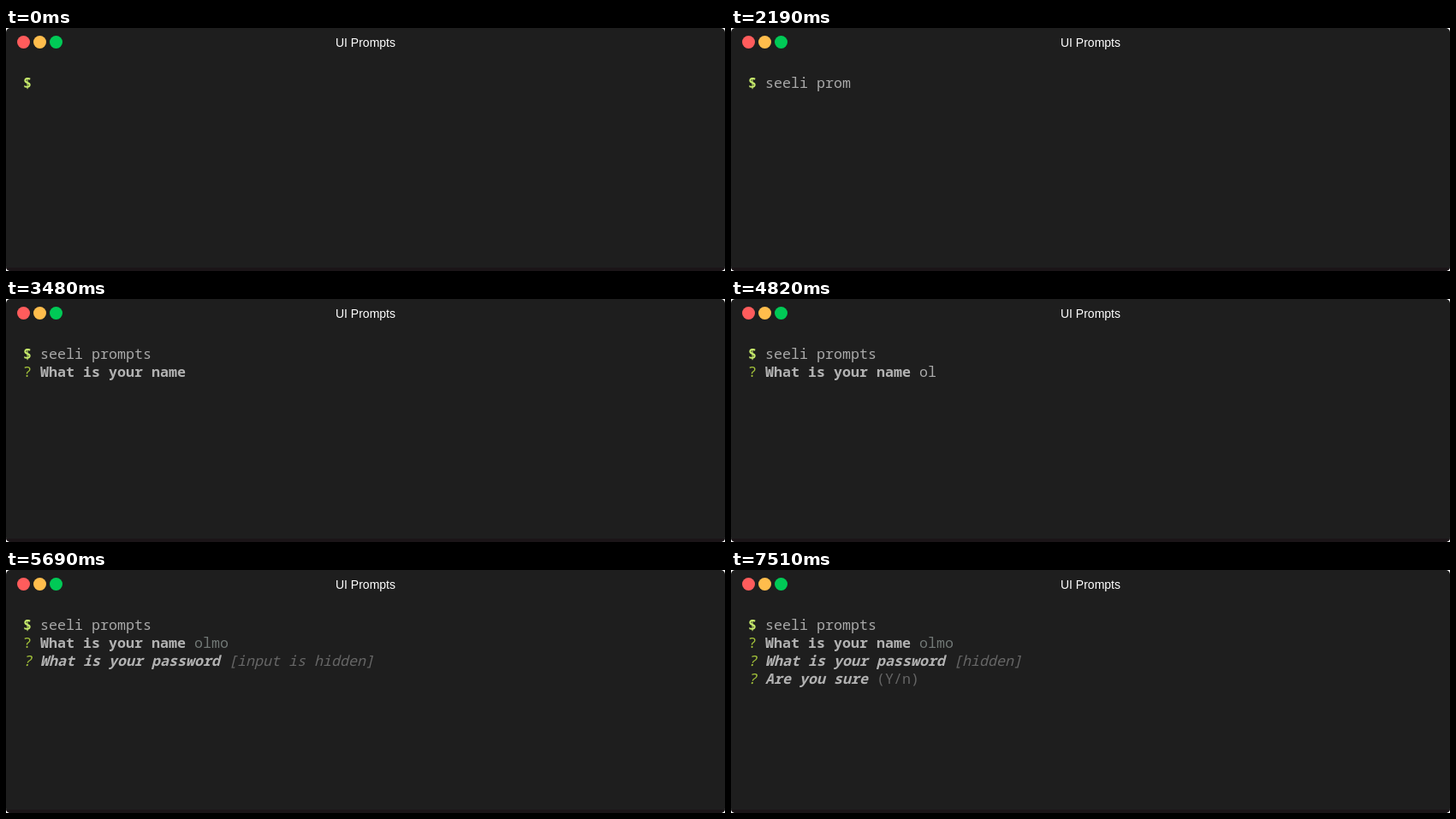
An HTML page that plays this animation: 840x284 px, repeating every 8 s.

```html
<!DOCTYPE html>
<html lang="en">
<head>
<meta charset="utf-8">
<title>UI Prompts</title>
<style>
  html, body { margin: 0; width: 100%; height: 100%; overflow: hidden; background: #fff; }
  svg { display: block; width: 840px; height: 284px; }
  text { white-space: pre; }
  .title { font: 14px "Liberation Sans", Arial, sans-serif; fill: #fff; text-anchor: middle; }
  #screen { font: 16.6667px "Noto Sans Mono", monospace; }
  .prompt { fill: #c8ec6c; font-weight: 700; }
  .plain { fill: #a9a9a9; }
  .mark { fill: #a4c43a; }
  .bold { fill: #b2b2b2; font-weight: 700; }
  .answer { fill: #717876; }
  .dim { fill: #666; }
  .slant { font-style: italic; }
</style>
</head>
<body>
<svg viewBox="0 0 840 284">
  <defs><clipPath id="window"><rect width="840" height="284" rx="5"/></clipPath></defs>
  <g clip-path="url(#window)">
    <rect width="840" height="284" fill="#1e1e1e"/>
    <rect y="280" width="840" height="4" fill="#1b1518"/>
  </g>
  <circle cx="20.5" cy="16.5" r="7.5" fill="#ff5c5c"/>
  <circle cx="39.5" cy="16.5" r="7.5" fill="#ffbd4c"/>
  <circle cx="58.5" cy="16.5" r="7.5" fill="#00ca56"/>
  <text class="title" x="420" y="22">UI Prompts</text>
  <g id="screen"></g>
</svg>
<script>
const LOOP = 8000;
const CELL = 10, LINE = 21, LEFT = 20, BASE = 70;

// row, column, text, classes, start time (or one time per character), end time
const runs = [
  [0, 0, "$", "prompt", 0],
  [0, 2, "seeli prompts", "plain",
    [550, 790, 920, 1090, 1320, 1690, 1690, 1870, 2030, 2190, 2350, 2580, 2810]],

  [1, 0, "?", "mark", 3480],
  [1, 2, "What is your name", "bold", 3480],
  [1, 20, "olmo", "plain", [4510, 4820, 5060, 5190], 5590],
  [1, 20, "olmo", "answer", 5590],

  [2, 0, "?", "mark slant", 5690],
  [2, 2, "What is your password", "bold slant", 5690],
  [2, 24, "[input is hidden]", "dim slant", 5690, 7510],
  [2, 24, "[hidden]", "dim slant", 7510],

  [3, 0, "?", "mark slant", 7510],
  [3, 2, "Are you sure", "bold slant", 7510],
  [3, 15, "(Y/n)", "dim", 7510],
].map(([row, col, text, classes, from, to = LOOP]) => {
  const node = document.createElementNS("http://www.w3.org/2000/svg", "text");
  node.setAttribute("class", classes);
  node.setAttribute("x", LEFT + col * CELL);
  node.setAttribute("y", BASE + row * LINE);
  document.getElementById("screen").append(node);
  return { node, text, from, to };
});

function shown({ text, from, to }, t) {
  if (t >= to) return "";
  if (Array.isArray(from)) return text.slice(0, from.filter(at => at <= t).length);
  return t >= from ? text : "";
}

function draw() {
  const t = performance.now() % LOOP;
  for (const run of runs) {
    const value = shown(run, t);
    if (run.node.textContent !== value) run.node.textContent = value;
  }
  requestAnimationFrame(draw);
}
draw();
</script>
</body>
</html>
```
